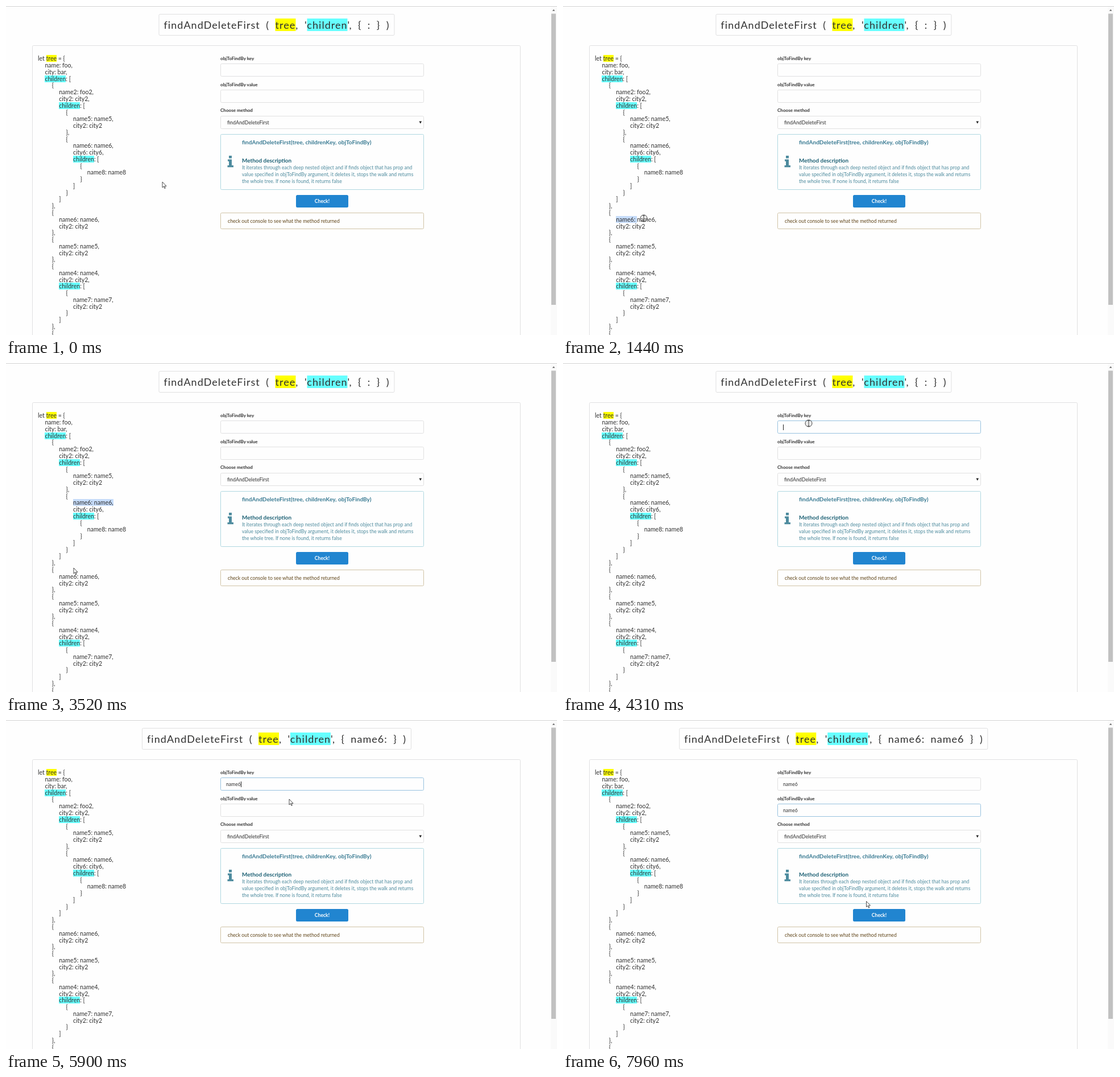
An HTML page for the animation above (7.99 s loop, 969 by 578 pixels).

```html
<!DOCTYPE html>
<html lang="en">
<head>
<meta charset="utf-8">
<title>findAndDeleteFirst</title>
<style>
  html, body { margin: 0; width: 100%; height: 100%; overflow: hidden; background: #fefefe; }
  body { position: relative; font: 8.6px/12px Lato, sans-serif; color: #303030; }
  body > * { position: absolute; box-sizing: border-box; white-space: nowrap; }
  mark { color: inherit; background: #6ff; }
  mark.tree { background: #ff0; }
  i { font-style: normal; background: #c6dcfa; }
  .box { border: 1px solid #e0e0e1; border-radius: 2.5px; }
  .field { left: 377px; width: 358px; height: 23px; padding-left: 9px; line-height: 22px; }
  .field.focus { border-color: #98c2df; }
  .caret { display: inline-block; width: 1px; height: 10px; background: #222; vertical-align: -2px; }
  .label { left: 377px; font-size: 8.1px; font-weight: bold; }
  #top { left: 0; top: 0; width: 969px; height: 1px; background: #d2d2d2; }
  #title { left: 476px; top: 14px; height: 38px; padding: 0 8px; transform: translateX(-50%);
    font-size: 18px; line-height: 36px; letter-spacing: 1.05px; word-spacing: 4.75px; }
  #panel { left: 46px; top: 69px; width: 859px; height: 530px; }
  #tree { left: 56px; top: 87.4px; font-size: 10.55px; line-height: 11.77px; }
  #select { top: 193px; padding-left: 11px; font-size: 8.85px; }
  #info { left: 377px; top: 225px; width: 358px; height: 98px; border-color: #b0d8e0; }
  .teal { left: 415px; color: #3a7b93; }
  .head { font-size: 10.1px; font-weight: bold; }
  #about { top: 265px; font-size: 9.95px; color: #1c6074; }
  #text { top: 279.2px; line-height: 11.85px; color: #4c8a9d; }
  #check { left: 510px; top: 332px; width: 92px; height: 22px; border-radius: 2.5px; background: #2185d0;
    color: #fff; font-weight: bold; line-height: 22px; text-align: center; }
  #note { left: 377px; top: 363px; width: 358px; height: 29px; padding-left: 12px; border-color: #d0c3a6;
    color: #61461a; font-size: 8.7px; line-height: 28px; }
  svg { left: 0; top: 0; width: 969px; height: 578px; }
</style>
</head>
<body>
<div id="top"></div>
<div id="title" class="box">findAndDeleteFirst ( <mark class="tree">tree</mark>, '<mark>children</mark>', <span id="query"></span> )</div>
<div id="panel" class="box"></div>
<div id="tree"></div>

<div class="label" style="top:85.7px">objToFindBy key</div>
<div id="key" class="box field" style="top:101px"></div>
<div class="label" style="top:131.6px">objToFindBy value</div>
<div id="value" class="box field" style="top:147px"></div>
<div class="label" style="top:177.4px">Choose method</div>
<div id="select" class="box field">findAndDeleteFirst</div>

<div id="info" class="box"></div>
<div class="teal head" style="top:233px">findAndDeleteFirst(tree, childrenKey, objToFindBy)</div>
<div id="about" class="teal head">Method description</div>
<div id="text" class="teal">It iterates through each deep nested object and if finds object that has prop and<br>value specified in objToFindBy argument, it deletes it, stops the walk and returns<br>the whole tree. If none is found, it returns false</div>
<div id="check">Check!</div>
<div id="note" class="box">check out console to see what the method returned</div>

<svg viewBox="0 0 969 578">
  <path fill="#4d8b9e" d="M392 263h5v4.500h-5zM390 269.500h7v10.500h3v3.200h-10.500v-3.200h2.500v-7.300h-2z"/>
  <path fill="#222" d="M726.500 202.500h4.600l-2.300 4.200z"/>
  <path fill="#fafafa" d="M958 1h11v577h-11z"/>
  <path fill="#c1c1c1" d="M959 13.500h8v511.500h-8z"/>
  <path fill="#555" d="M960.800 8.500h4.600l-2.300-2.500z"/>
  <g id="cursor">
    <path id="arrow" d="M0 0V10l2.300-2.200 1.600 3.700 1.500-.6-1.600-3.500H7z" fill="#fff" stroke="#222" stroke-width=".8"/>
    <g id="beam" fill="none" stroke="#333" stroke-width=".9">
      <circle id="press" r="6" fill="#bbb" fill-opacity=".25"/>
      <path d="M-2-5H2M0-5V5M-2 5H2"/>
    </g>
  </g>
</svg>

<script>
const LOOP = 7990, BLINK = 530;
const $ = id => document.getElementById(id);

const source = `let tree = {
 name: foo,
 city: bar,
 children: [
  {
   name2: foo2,
   city2: city2,
   children: [
    {
     name5: name5,
     city2: city2
    },
    {
     name6: name6,
     city6: city6,
     children: [
      {
       name8: name8
      }
     ]
    }
   ]
  },
  {
   name6: name6,
   city2: city2
  },
  {
   name5: name5,
   city2: city2
  },
  {
   name4: name4,
   city2: city2,
   children: [
    {
     name7: name7,
     city2: city2
    }
   ]
  },
  {`;

const rows = source.split('\n').map(line => {
  const row = document.createElement('div');
  const text = line.trimStart();
  row.style.paddingLeft = (line.length - text.length) * 12.4 + 'px';
  row.innerHTML = text.replace('tree', '<mark class="tree">tree</mark>')
                      .replace('children', '<mark>children</mark>');
  $('tree').append(row);
  return row;
});

// Cursor hotspot: time, x, y
const path = [
  [70, 271, 308], [220, 271, 308], [420, 215, 283], [920, 96, 374], [1220, 96, 374],
  [1440, 142, 373], [1620, 165, 376], [1720, 162, 378], [2000, 138, 269], [2300, 118, 248],
  [2540, 118, 248], [2790, 188, 247], [2850, 188, 247], [3080, 165, 330], [3300, 90, 380],
  [3500, 119, 360], [3650, 119, 360], [3720, 112, 365], [4260, 432, 106], [4440, 432, 106],
  [4570, 498, 139], [7520, 498, 139], [7960, 533.5, 318.5]
];
const keyTimes = [5110, 5150, 5290, 5340, 5850];
const valueTimes = [6340, 6380, 6530, 6590, 6990];
const FOCUS = 4290, TAB = 6000;
const caretResets = [FOCUS, ...keyTimes, TAB, ...valueTimes];

const within = (t, ...spans) => spans.some(([a, b]) => t >= a && t < b);
const clamp = v => Math.max(0, Math.min(1, v));
const typed = (t, times) => 'name6'.slice(0, times.filter(at => at <= t).length);

function cursorAt(t) {
  if (t < 70) return [275, 309];
  const next = path.findIndex(p => p[0] > t);
  if (next < 0) return path.at(-1).slice(1);
  const [t0, x0, y0] = path[next - 1], [t1, x1, y1] = path[next];
  const u = (t - t0) / (t1 - t0), e = u * u * (3 - 2 * u);
  return [x0 + (x1 - x0) * e, y0 + (y1 - y0) * e];
}

function select(row, amount) {
  const text = row.textContent, count = Math.round(text.length * clamp(amount));
  row.innerHTML = `<i>${text.slice(0, count)}</i>${text.slice(count)}`;
}

function fill(field, text, focused, caret) {
  field.className = 'box field' + (focused ? ' focus' : '');
  field.innerHTML = text + (focused && caret ? '<span class="caret"></span>' : '');
}

function draw(now) {
  const t = now % LOOP;
  const key = typed(t, keyTimes), value = typed(t, valueTimes);
  const lastReset = caretResets.filter(at => at <= t).pop();
  const caret = (t - lastReset) % (2 * BLINK) < BLINK;

  $('query').textContent = `{ ${key}: ${value} }`;
  fill($('key'), key, t >= FOCUS && t < TAB, caret);
  fill($('value'), value, t >= TAB, caret);
  select(rows[24], t < 2480 ? (t - 1240) / 370 : 0);
  select(rows[13], t < FOCUS ? (t - 2560) / 230 : 0);

  const beam = within(t, [760, 3400], [4200, 4530]);
  const press = within(t, [1220, 1660], [2480, 2840], [4280, 4480]);
  $('cursor').setAttribute('transform', `translate(${cursorAt(t)})`);
  $('arrow').style.display = beam ? 'none' : '';
  $('beam').style.display = beam ? '' : 'none';
  $('press').style.display = press ? '' : 'none';
  requestAnimationFrame(draw);
}
requestAnimationFrame(draw);
</script>
</body>
</html>
```
